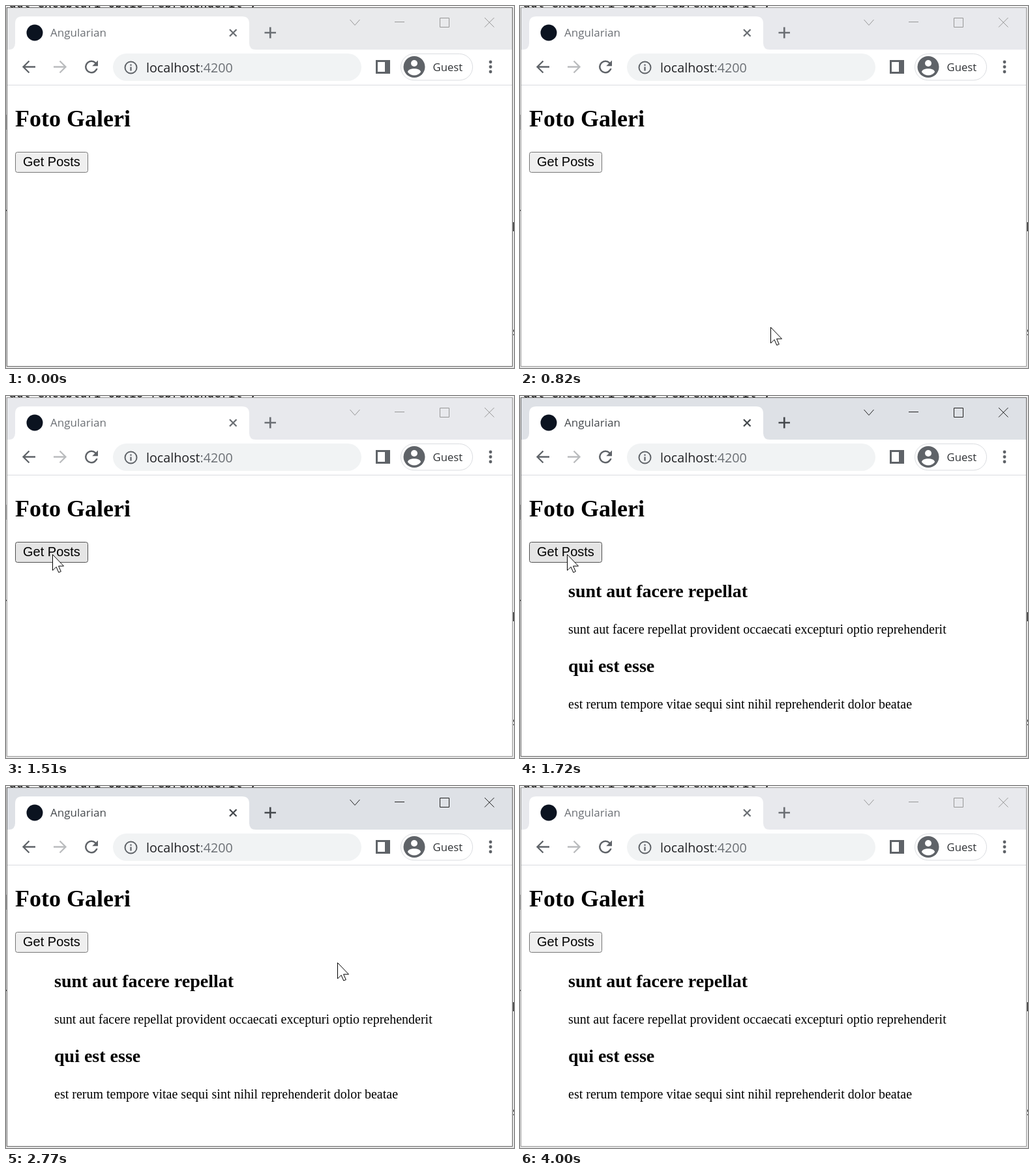
An HTML page that plays this animation: 779 px wide and 556 px high, repeating every 4060 ms.

```html
<!DOCTYPE html>
<html lang="tr">
<head>
<meta charset="utf-8">
<title>Foto Galeri</title>
<style>
  html, body { margin: 0; width: 100%; height: 100%; overflow: hidden; background: #e4e4e4; }
  svg { display: block; width: 779px; height: 556px; }
  text { white-space: pre; }
  .ui { font-family: "Open Sans", "Noto Sans", sans-serif; }
  .serif { font-family: "Liberation Serif", "Times New Roman", serif; }
  .sans { font-family: "Liberation Sans", Arial, sans-serif; }
  .mono { font: 18px "DejaVu Sans Mono", monospace; }
  .bold { font-weight: bold; }
  .line { fill: none; stroke: #5f6368; stroke-width: 2.3; }
  .gray { fill: #5f6368; }

  #stage { --bar: #e8e9ed; --edge: #9c9c9c; --tab: #6b6f74; --control: #979797; }
  #stage.waking { --bar: #e9eaec; }
  #stage.dark-edge { --edge: #686868; }
  #stage.active { --bar: #dee1e6; --edge: #686868; --tab: #45494d; --control: #202020; }

  #window { fill: #fff; stroke: var(--edge); }
  #bar { fill: var(--bar); }
  #tabTitle { fill: var(--tab); }
  #tabIcons { fill: none; stroke: var(--tab); }
  #controls { fill: none; stroke: var(--control); }

  #button rect { fill: #efefef; stroke: #767676; }
  #button.hover rect { fill: #e5e5e5; stroke: #4f4f4f; }
  #button.pressed rect { fill: #f5f5f5; stroke: #8d8d8d; }
</style>
</head>
<body>
<svg id="stage" viewBox="0 0 779 556">
  <!-- editor behind the window -->
  <rect width="779" height="2" fill="#f3f3f3"/>
  <g class="mono" fill="#111">
    <text x="4.8" y="2">aut excepturi optio reprehenderit',</text>
    <text x="776" y="22">r</text>
    <text x="776" y="346">b</text>
    <text x="776" y="506">s</text>
  </g>
  <path d="M0 167h2v23h-2z" fill="#aaa"/>
  <path d="M0 313h2v2h-2z" fill="#555"/>

  <!-- browser frame -->
  <rect id="window" x="1.5" y="2.5" width="775" height="551"/>
  <rect id="bar" x="2" y="3" width="774" height="64"/>
  <path d="M4 67Q14 67 14 57V27Q14 16 25 16H362Q373 16 373 27V57Q373 67 383 67Z" fill="#fff"/>
  <circle cx="44" cy="41" r="12.5" fill="#0b1320"/>
  <text id="tabTitle" class="ui" x="68" y="47" font-size="17">Angularian</text>
  <g id="tabIcons">
    <path d="M343 36l10.5 10.5m0-10.5L343 46.500" stroke-width="2.3"/>
    <path d="M396.500 41h17.500M405.250 32.500v17" stroke-width="2.7"/>
  </g>
  <path id="controls" d="M527.500 21l7.500 8.500 7.500-8.500M596 24.500h15M665.500 18.500h14v14h-14zM734 18l14.500 14.500m0-14.500L734 32.500"/>

  <!-- toolbar -->
  <path d="M2 121.500H776" stroke="#dadce0"/>
  <path class="line" d="M45 93.500H27M35.500 84.500l-9 9 9 9"/>
  <path class="line" style="stroke:#babcbe" d="M73 93.500H91M82.500 84.500l9 9-9 9"/>
  <path class="gray" transform="translate(116 78.500) scale(1.25)" d="M17.65 6.35A7.96 7.96 0 0 0 12 4a8 8 0 1 0 7.73 10h-2.08A6 6 0 1 1 12 6c1.66 0 3.14.69 4.22 1.78L13 11h7V4z"/>
  <rect x="164" y="73" width="381" height="42" rx="21" fill="#f1f3f4"/>
  <circle class="line" cx="191.500" cy="94.500" r="9" style="stroke-width:2"/>
  <path class="gray" d="M190.400 93.500h2.200v6h-2.200zM190.400 89.500h2.200v2.200h-2.200z"/>
  <text class="ui" x="215" y="102" font-size="19.7" fill="#202124">localhost<tspan fill="#6b6f74">:4200</tspan></text>
  <path class="gray" fill-rule="evenodd" d="M567 83h22v21h-22zM570 86v15h11v-15z"/>
  <rect x="605.500" y="73.500" width="110" height="40.500" rx="20.200" fill="#fff" stroke="#dadce0"/>
  <circle class="gray" cx="626" cy="93.500" r="16.500"/>
  <circle cx="626" cy="88" r="5" fill="#fff"/>
  <path d="M616 101.500C616 94.500 636 94.500 636 101.500Q632 106.500 626 106.500T616 101.500Z" fill="#fff"/>
  <text class="ui" x="654.500" y="100" font-size="16.7" fill="#303336">Guest</text>
  <g class="gray">
    <circle cx="743" cy="86" r="2.400"/>
    <circle cx="743" cy="93.500" r="2.400"/>
    <circle cx="743" cy="101" r="2.400"/>
  </g>

  <!-- page -->
  <text class="serif bold" x="14" y="185" font-size="36">Foto Galeri</text>
  <g id="button">
    <rect x="14.500" y="224.500" width="111" height="31" rx="3"/>
    <text class="sans" x="26" y="246" font-size="20">Get Posts</text>
  </g>
  <g id="posts" class="serif" font-size="20">
    <text class="bold" x="74" y="309" font-size="28">sunt aut facere repellat</text>
    <text x="74" y="365">sunt aut facere repellat provident occaecati excepturi optio reprehenderit</text>
    <text class="bold" x="74" y="424" font-size="28">qui est esse</text>
    <text x="74" y="480">est rerum tempore vitae sequi sint nihil reprehenderit dolor beatae</text>
  </g>
  <path id="cursor" d="M.5.500V25L6 19.500 9.800 28 13.300 26.500 9.600 18.200H17.500Z" fill="#fff" stroke="#000"/>
</svg>
<script>
  const LOOP = 4060;
  const ACTIVATE = 1560, LOAD = 1720, DEACTIVATE = 4000;
  const HIDE_CURSOR = 3540;

  const easeOut = power => u => 1 - (1 - u) ** power;
  const easeIn = power => u => u ** power;
  const linear = u => u;
  const smooth = u => u * u * (3 - 2 * u);

  // The pointer is sampled at a fixed number of poses in each move.
  const moves = [
    { start: 820, end: 1290, poses: 10, from: [384, 493], to: [83, 251], ease: [easeOut(2.07), easeOut(1.74)] },
    { start: 1360, end: 1510, poses: 4, from: [80, 249], to: [71, 243], ease: [linear, linear] },
    { start: 1560, end: 1561, poses: 2, from: [72, 243], to: [72, 243], ease: [linear, linear] },
    { start: 2400, end: 2770, poses: 8, from: [80, 244], to: [508, 271], ease: [smooth, smooth] },
    { start: 3370, end: 3480, poses: 3, from: [514, 284], to: [560, 508], ease: [easeIn(1.4), easeIn(1.4)] }
  ];

  const [stage, button, posts, cursor] =
    ["stage", "button", "posts", "cursor"].map(id => document.getElementById(id));

  function cursorAt(time) {
    if (time >= HIDE_CURSOR) return null;
    const move = moves.findLast(m => time >= m.start);
    if (!move) return null;
    const last = move.poses - 1;
    const progress = Math.min(1, (time - move.start) / (move.end - move.start));
    const u = Math.floor(progress * last + 1e-6) / last;
    return move.from.map((a, i) => Math.round(a + (move.to[i] - a) * move.ease[i](u)));
  }

  function draw(time) {
    const active = time >= ACTIVATE && time < DEACTIVATE;
    stage.classList.toggle("active", active);
    stage.classList.toggle("waking", time < 50);
    stage.classList.toggle("dark-edge", time < 200);
    posts.style.display = time >= LOAD ? "" : "none";

    const point = cursorAt(time);
    cursor.style.display = point ? "" : "none";
    if (point) cursor.setAttribute("transform", `translate(${point})`);

    const hover = time >= 1360 && point && point[0] < 126 && point[1] < 256;
    button.classList.toggle("hover", !!hover);
    button.classList.toggle("pressed", time >= ACTIVATE && time < 1660);
  }

  const begin = performance.now();
  function tick() {
    draw((performance.now() - begin) % LOOP);
    requestAnimationFrame(tick);
  }
  tick();
</script>
</body>
</html>
```
